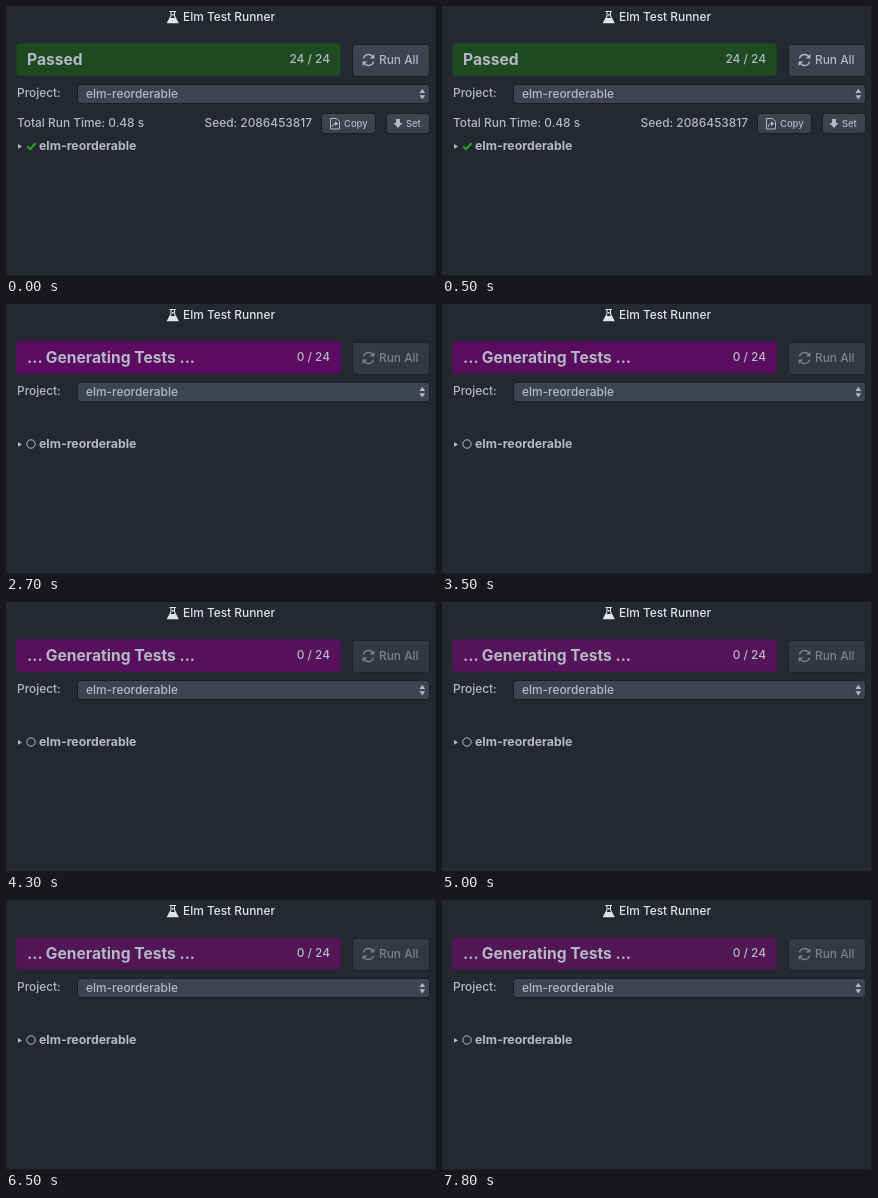
Write an HTML page that moves like this. It is 430x270 px and loops after 8 s.

```html
<!DOCTYPE html>
<html lang="en">
<head>
<meta charset="utf-8">
<title>Elm Test Runner</title>
<style>
  html, body { margin: 0; width: 100%; height: 100%; overflow: hidden; background: #242831; }
  svg { display: block; width: 430px; height: 270px; }
  text { font: 500 11.9px Inter, "Open Sans", sans-serif; fill: #b3b9c5; white-space: pre; }
  .title { fill: #e2e4e8; }
  .status { font-weight: 700; font-size: 15.6px; }
  .count { text-anchor: end; }
  .small { font-size: 9.4px; }
  .suite { font-weight: 700; font-size: 12.3px; }
  .box { fill: url(#face); stroke: #1a1d24; }
  .icon { fill: #b3b9c5; }
  .line { fill: none; stroke: #b3b9c5; stroke-width: 1.4; }
  .thin { stroke-width: 1; }
  .disabled { opacity: .62; }
  #bar { fill: currentColor; stroke: currentColor; stroke-opacity: .5; }
  #running { opacity: 0; }
</style>
</head>
<body>
<svg viewBox="0 0 430 270">
  <defs>
    <linearGradient id="face" x2="0" y2="1">
      <stop stop-color="#404552"/>
      <stop offset="1" stop-color="#3a3f4b"/>
    </linearGradient>
    <g id="runAll">
      <rect class="box" x="346.5" y="38.5" width="77" height="32" rx="3"/>
      <path class="line" d="M357.4 52.4A5.2 5.2 0 0 1 366.5 50.4M367.6 55.6A5.2 5.2 0 0 1 358.5 57.6"/>
      <path class="icon" d="M368.4 48v4.6h-4.6zM356.6 60v-4.6h4.6z"/>
      <text x="373" y="58">Run All</text>
    </g>
  </defs>

  <rect width="430" height="270" fill="#242831"/>
  <path d="M429.5 0V269.5H0" fill="none" stroke="#191c22"/>

  <path d="M163.5 5.5h6.5M165 5.5v4.5l-3.4 6.6h10.3l-3.4-6.6V5.5" fill="none" stroke="#e2e4e8" stroke-width="1.1"/>
  <path d="M164 12h5.4l2.6 5h-10.6zM166 8h1.6v1.6H166z" fill="#e2e4e8"/>
  <text class="title" x="177" y="15">Elm Test Runner</text>

  <rect id="bar" x="10.5" y="37.5" width="324" height="32" rx="3.5" color="#1d4a20"/>

  <text x="11" y="91">Project:</text>
  <rect class="box" x="71.5" y="78.5" width="352" height="19" rx="3" style="fill:#3d4350"/>
  <text x="80" y="92">elm-reorderable</text>
  <path class="icon" d="M413.5 87l2.8-4.2 2.8 4.2zM413.5 89.2l2.8 4.2 2.8-4.2z"/>

  <path class="icon" d="M12 138l4 2.4-4 2.4z"/>
  <text class="suite" x="33" y="144">elm-reorderable</text>

  <g id="passed">
    <text class="status" x="21" y="59">Passed</text>
    <text class="count" x="324" y="57">24 / 24</text>
    <use href="#runAll"/>
    <text x="11" y="121">Total Run Time: 0.48 s</text>
    <text x="306" y="121" text-anchor="end">Seed: 2086453817</text>

    <rect class="box" x="315.5" y="107.5" width="54" height="20" rx="3"/>
    <path class="line thin" d="M324.5 112.5h6l3 3v7.5h-9zM326.4 121c0-2.4 1-3.4 3-3.4"/>
    <path class="icon" d="M329 115.3l3.2 2.4-3.2 2.4z"/>
    <text class="small" x="338" y="121">Copy</text>

    <rect class="box" x="380.5" y="107.5" width="43" height="20" rx="3"/>
    <path class="icon" d="M390 113h4v4h2.6l-4.6 5-4.6-5h2.6z"/>
    <text class="small" x="400" y="121">Set</text>

    <path d="M21 140.2l3 3 5.6-6" fill="none" stroke="#1fa824" stroke-width="2"/>
  </g>

  <g id="running">
    <text class="status" x="21" y="59">... Generating Tests ...</text>
    <text class="count" x="324" y="57">0 / 24</text>
    <use href="#runAll" class="disabled"/>
    <circle class="line thin" cx="25" cy="140" r="4.2"/>
  </g>
</svg>
<script>
  const LOOP = 8000;
  const START = 1900;

  const play = (id, prop, steps) =>
    document.getElementById(id).animate(
      steps.map(([time, value, easing = "linear"]) =>
        ({ offset: time / LOOP, [prop]: value, easing })),
      { duration: LOOP, iterations: Infinity }
    ).startTime = 0;

  const swap = (id, before, after) => play(id, "opacity", [
    [0, before], [START, before], [START, after], [LOOP, after]
  ]);

  swap("passed", 1, 0);
  swap("running", 0, 1);

  // Green turns purple in 100 ms steps, then slowly loses saturation.
  play("bar", "color", [
    [0, "#1d4a20"],
    [START, "#1d4a20", "steps(7, start)"],
    [2600, "#5c0b62", "steps(9, end)"],
    [3500, "#5a0d5f", "steps(15, end)"],
    [5000, "#551359", "steps(15, end)"],
    [6500, "#521556", "steps(15, end)"],
    [LOOP, "#511654"]
  ]);
</script>
</body>
</html>
```
